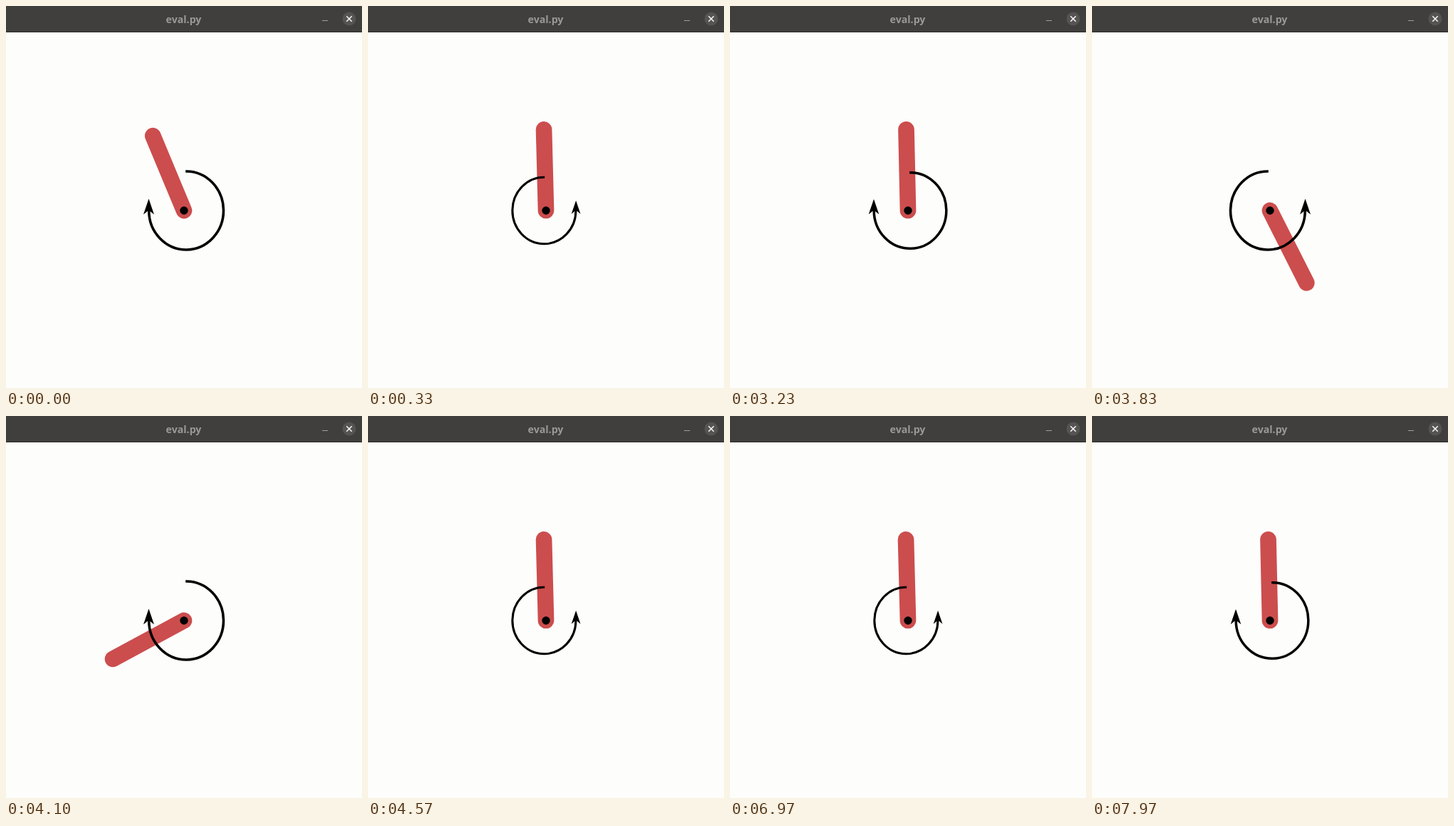
Animation of 500 by 536 pixels, one loop 8000 ms. Source, as an HTML page:

```html
<!DOCTYPE html>
<html lang="en">
<head>
<meta charset="utf-8">
<title>eval.py</title>
<style>
  html, body { margin: 0; width: 100%; height: 100%; overflow: hidden; background: #fdfdfc; }
  svg { display: block; width: 500px; height: 536px; }
  .title { font: bold 14.2px "Open Sans", "Noto Sans", sans-serif; fill: #9a9997; text-anchor: middle; }
</style>
</head>
<body>
<svg viewBox="0 0 500 536">
  <rect width="500" height="536" fill="#fdfdfc"/>
  <rect width="500" height="37" fill="#403f3e"/>
  <rect y="36" width="500" height="1" fill="#2a2928"/>
  <text class="title" x="249.5" y="24">eval.py</text>
  <path d="M444 20.5h8" stroke="#a09f9c"/>
  <circle cx="482" cy="18" r="9.5" fill="#555452"/>
  <path d="M478.3 14.3l7.4 7.4m0 -7.4l-7.4 7.4" stroke="#f4f4f2" stroke-width="1.6"/>
  <g transform="translate(250 287)">
    <path id="rod" d="M0 0V113.6" stroke="#cc4d4d" stroke-width="22.7" stroke-linecap="round"/>
    <g id="arrow">
      <path d="M2.2 -55A52.4 55 0 1 1 -49.3 0V-4" fill="none" stroke="#000" stroke-width="3.6"/>
      <path d="M-49.5 -16.5L-42 5.5L-49.5 -0.5L-57 5.5Z"/>
    </g>
    <circle r="5.7"/>
  </g>
</svg>
<script>
  const LOOP = 8000, FRAME = 100 / 3, DT = 0.05;
  const RESET = 109, BRAKE = 133, SETTLED = 137;
  const rod = document.getElementById('rod');
  const arrow = document.getElementById('arrow');

  // Angles run counter-clockwise from hanging down; positive torque is counter-clockwise.
  const REST = { angle: Math.PI + 0.026, torque: 1.7 };
  const REST_ALT = { angle: Math.PI + 0.022, torque: -1.94 };

  // Pendulum under full torque, two physics steps per frame.
  function swing(frames) {
    let angle = 0.33, speed = 0, torque = 2;
    for (let i = 0; i < frames * 2; i++) {
      torque = i >= 16 && i < 35 ? -2 : 2;
      speed += (3 * torque - 15 * Math.sin(angle)) * DT;
      angle += speed * DT;
    }
    return { angle, speed, torque };
  }

  // Cubic from a moving state to rest; p runs from 0 to 1.
  function settle(from, velocity, p) {
    const q = 1 - p;
    return from * q * q * (1 + 2 * p) + velocity * p * q * q + REST.angle * p * p * (3 - 2 * p);
  }

  function pose(k) {
    if (k < 8) {
      return { angle: settle(Math.PI + 0.395, -0.64, k / 8), torque: k < 5 ? -2 : 1.7 };
    }
    if (k >= RESET && k <= BRAKE) return swing(k - RESET);
    if (k > BRAKE && k < SETTLED) {
      const n = SETTLED - BRAKE, s = swing(BRAKE - RESET);
      return { angle: settle(s.angle, s.speed * 2 * DT * n, (k - BRAKE) / n), torque: -2 };
    }
    const flicker = (k >= 83 && k < RESET) || k >= 211;
    return flicker && k % 2 ? REST_ALT : REST;
  }

  function draw(now) {
    const k = Math.floor((now % LOOP) / FRAME + 0.2) % 240;
    const { angle, torque } = pose(k);
    const size = Math.abs(torque) / 2;
    rod.setAttribute('transform', `rotate(${-angle * 180 / Math.PI})`);
    arrow.setAttribute('transform', `scale(${torque > 0 ? -size : size} ${size})`);
  }

  const start = performance.now();
  function tick() {
    draw(performance.now() - start);
    requestAnimationFrame(tick);
  }
  tick();
</script>
</body>
</html>
```
